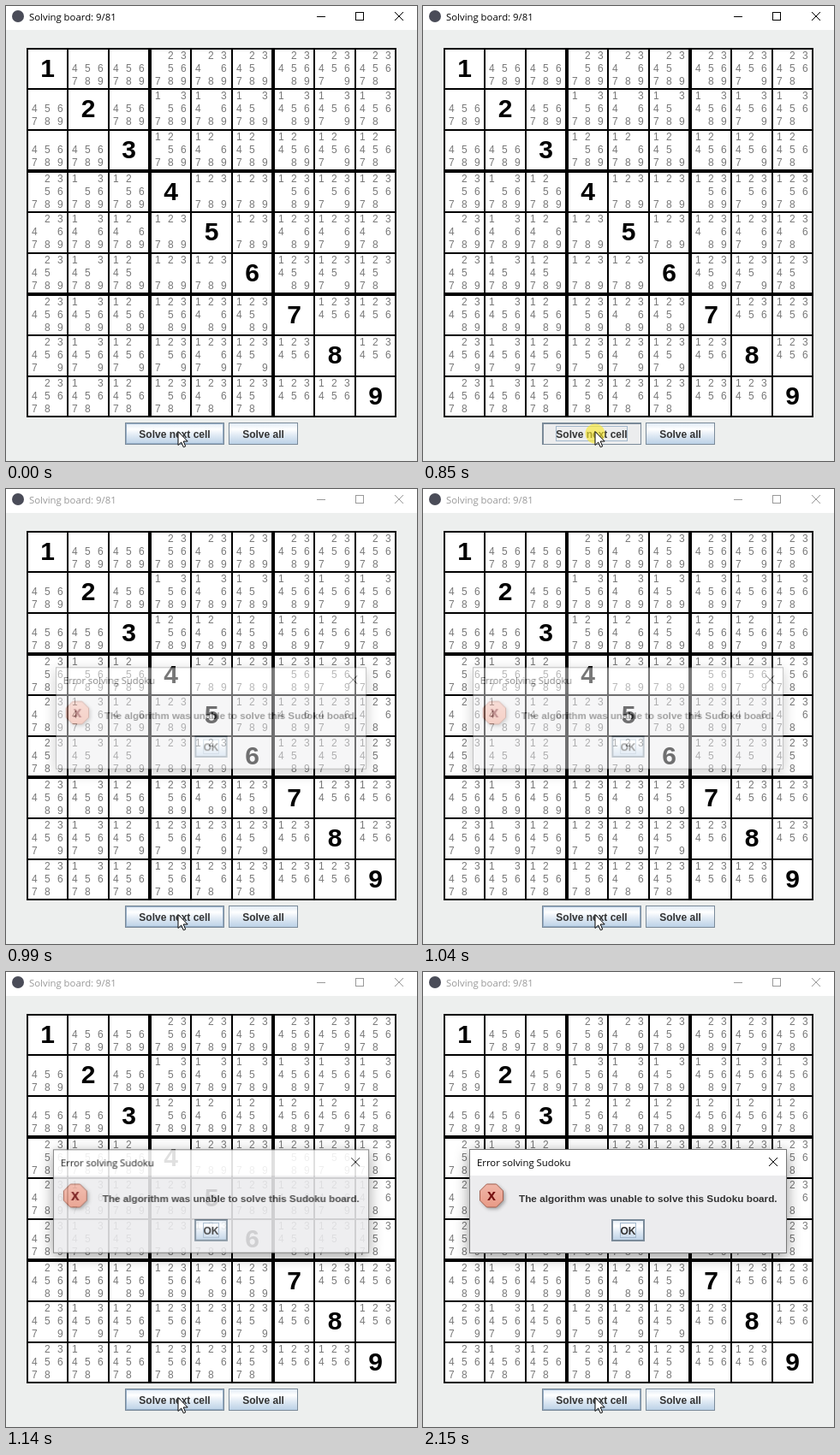
Animation of 480x532 px, one loop 2.77 s. Source, as an HTML page with a canvas:

```html
<!DOCTYPE html>
<html lang="en">
<head>
<meta charset="utf-8">
<title>Sudoku solver</title>
<style>
html, body { margin: 0; width: 100%; height: 100%; overflow: hidden; background: #edefee; }
canvas { display: block; }
</style>
</head>
<body>
<canvas id="stage" width="480" height="532"></canvas>
<script>
const W = 480, H = 532, LOOP = 2770;
const PRESS = 850, GLOW_END = 920, RELEASE = 990;
const PANEL = '#edefee', EDGE = '#7a8a99', FOCUS = '#a3b8cc', INK = '#333';
const SANS = '"Liberation Sans", Arial, sans-serif';
const UI = '11.35px "Open Sans", "Noto Sans", sans-serif';
const BUTTON_FONT = 'bold 12px ' + SANS;
const MESSAGE_FONT = 'bold 11.75px ' + SANS;
const BOARD = { x: 24, y: 49, cell: 48, n: 9 };
const FADE = [[990, 0.47], [1080, 0.7], [1140, 0.88], [1210, 1]];

const ctx = document.getElementById('stage').getContext('2d');

function layer(paint) {
  const c = document.createElement('canvas');
  c.width = W;
  c.height = H;
  paint(c.getContext('2d'));
  return c;
}

function box(g, x, y, w, h, fill) {
  g.fillStyle = fill;
  g.fillRect(x, y, w, h);
}

function frame(g, x, y, w, h, color) {
  g.strokeStyle = color;
  g.lineWidth = 1;
  g.strokeRect(x + 0.5, y + 0.5, w - 1, h - 1);
}

function label(g, str, x, y, font, color, align = 'left') {
  g.font = font;
  g.fillStyle = color;
  g.textAlign = align;
  g.fillText(str, x, y);
}

function cross(g, x, y, size, color) {
  g.strokeStyle = color;
  g.lineWidth = 1;
  g.beginPath();
  g.moveTo(x, y);
  g.lineTo(x + size, y + size);
  g.moveTo(x + size, y);
  g.lineTo(x, y + size);
  g.stroke();
}

function polygon(g, points) {
  g.beginPath();
  points.forEach(([x, y]) => g.lineTo(x, y));
  g.closePath();
}

function button(g, x, y, w, h, text, { pressed, inner, focus } = {}) {
  let fill = '#ecedee';
  if (!pressed) {
    fill = g.createLinearGradient(0, y, 0, y + h);
    fill.addColorStop(0, '#dde8f3');
    fill.addColorStop(0.3, '#fff');
    fill.addColorStop(0.6, '#dde8f3');
    fill.addColorStop(1, '#b8cfe5');
  }
  box(g, x, y, w, h, fill);
  frame(g, x, y, w, h, EDGE);
  if (pressed) {
    box(g, x + 1, y + 1, w - 2, 1, EDGE);
    box(g, x + 1, y + 1, 1, h - 2, EDGE);
  }
  if (inner) frame(g, x + 1, y + 1, w - 2, h - 2, inner);
  if (focus) frame(g, x + focus, y + 4, w - 2 * focus, h - 8, FOCUS);
  label(g, text, x + w / 2, y + 18, BUTTON_FONT, INK, 'center');
}

// Only the diagonal is filled, with the value r + 1 at (r, r).
function allowed(r, c, v) {
  const d = v - 1, band = Math.floor(d / 3);
  const sameBox = Math.floor(r / 3) === band && Math.floor(c / 3) === band;
  return d !== r && d !== c && !sameBox;
}

// Borders are 2px at the edges of each 3x3 box, 1px elsewhere.
const inset = i => i * BOARD.cell + (i % 3 ? 1 : 2);
const inner = i => i % 3 === 1 ? 46 : 45;

function drawCell(g, r, c) {
  const x = BOARD.x + inset(c), y = BOARD.y + inset(r);
  if (r === c) {
    label(g, r + 1, x + inner(c) / 2, y + 32, 'bold 30px ' + SANS, '#000', 'center');
    return;
  }
  for (let v = 1; v <= 9; v++) {
    if (!allowed(r, c, v)) continue;
    const col = (v - 1) % 3, row = Math.floor((v - 1) / 3);
    label(g, v, x + col * 15 + 4, y + row * 15 + 11, '12px ' + SANS, '#787878');
  }
}

function drawBoard(g) {
  const { x, y, cell, n } = BOARD, size = cell * n;
  box(g, x, y, size, size, '#fff');
  for (let i = 1; i < n; i++) {
    const t = i % 3 ? 2 : 4;
    box(g, x + i * cell - t / 2, y, t, size, '#000');
    box(g, x, y + i * cell - t / 2, size, t, '#000');
  }
  g.strokeStyle = '#000';
  g.lineWidth = 2;
  g.strokeRect(x + 1, y + 1, size - 2, size - 2);
  for (let r = 0; r < n; r++)
    for (let c = 0; c < n; c++) drawCell(g, r, c);
}

function drawTitleBar(g, active) {
  const color = active ? '#000' : '#999';
  box(g, 0, 0, W, 28, '#fff');
  g.fillStyle = '#4a4c58';
  g.beginPath();
  g.arc(14, 12, 7, 0, 7);
  g.fill();
  label(g, 'Solving board: 9/81', 27, 17, UI, color);
  box(g, 363, 12, 10, 1, color);
  frame(g, 408, 7, 10, 10, color);
  cross(g, 454, 7, 10, color);
}

function drawCursor(g) {
  const x = 201, y = 497.5;
  polygon(g, [[0, 0], [0, 16], [3.7, 12.5], [6.3, 18.3], [8.7, 17.3], [6.2, 11.5], [11.2, 11.5]]
    .map(([px, py]) => [x + px, y + py]));
  g.fillStyle = '#fff';
  g.fill();
  g.strokeStyle = '#000';
  g.lineWidth = 1;
  g.stroke();
}

function drawErrorIcon(g, cx, cy) {
  const octagon = Array.from({ length: 8 }, (_, i) => {
    const a = (i + 0.5) * Math.PI / 4;
    return [cx + 14.6 * Math.cos(a), cy + 14.6 * Math.sin(a)];
  });
  const fill = g.createLinearGradient(cx, cy - 14, cx, cy + 14);
  fill.addColorStop(0, '#f0b6a8');
  fill.addColorStop(1, '#e89a86');
  g.save();
  g.shadowColor = 'rgba(0,0,0,.35)';
  g.shadowBlur = 4;
  g.shadowOffsetX = g.shadowOffsetY = 2;
  polygon(g, octagon);
  g.fillStyle = fill;
  g.fill();
  g.restore();
  g.strokeStyle = '#a2604f';
  g.lineWidth = 1;
  g.stroke();
  label(g, 'x', cx, cy + 5, 'bold 18px ' + SANS, '#751010', 'center');
}

const dialog = layer(g => {
  g.save();
  g.shadowColor = 'rgba(0,0,0,.42)';
  g.shadowBlur = 16;
  g.shadowOffsetY = 4;
  box(g, 54, 207, 371, 122, '#777');
  g.restore();
  box(g, 55, 208, 369, 30, '#fff');
  box(g, 55, 238, 369, 90, '#ececee');
  label(g, 'Error solving Sudoku', 63, 227, UI, '#000');
  cross(g, 404, 217, 10, '#000');
  drawErrorIcon(g, 80, 261.5);
  label(g, 'The algorithm was unable to solve this Sudoku board.', 112, 269, MESSAGE_FONT, INK);
  button(g, 220, 289, 39, 26, 'OK', { inner: EDGE, focus: 10 });
});

const base = layer(g => {
  box(g, 0, 0, W, H, PANEL);
  drawBoard(g);
  button(g, 260, 487, 81, 26, 'Solve all');
});

function drawDialog(alpha) {
  const cx = 239.5, cy = 268, scale = 0.96 + 0.04 * alpha;
  ctx.save();
  ctx.globalAlpha = alpha;
  ctx.translate(cx, cy);
  ctx.scale(scale, scale);
  ctx.drawImage(dialog, -cx, -cy);
  ctx.restore();
}

function render(t) {
  const pressed = t >= PRESS && t < RELEASE;
  ctx.drawImage(base, 0, 0);
  drawTitleBar(ctx, t < RELEASE);
  button(ctx, 139, 487, 116, 26, 'Solve next cell',
    pressed ? { pressed, focus: 16 } : { inner: '#93abc4' });
  if (pressed && t < GLOW_END) {
    ctx.fillStyle = 'rgba(250,232,40,.62)';
    ctx.beginPath();
    ctx.arc(201, 500, 11.5, 0, 7);
    ctx.fill();
  }
  const step = FADE.filter(([at]) => t >= at).pop();
  if (step) drawDialog(step[1]);
  drawCursor(ctx);
}

const start = performance.now();
function tick() {
  render((performance.now() - start) % LOOP);
  requestAnimationFrame(tick);
}
tick();
</script>
</body>
</html>
```
